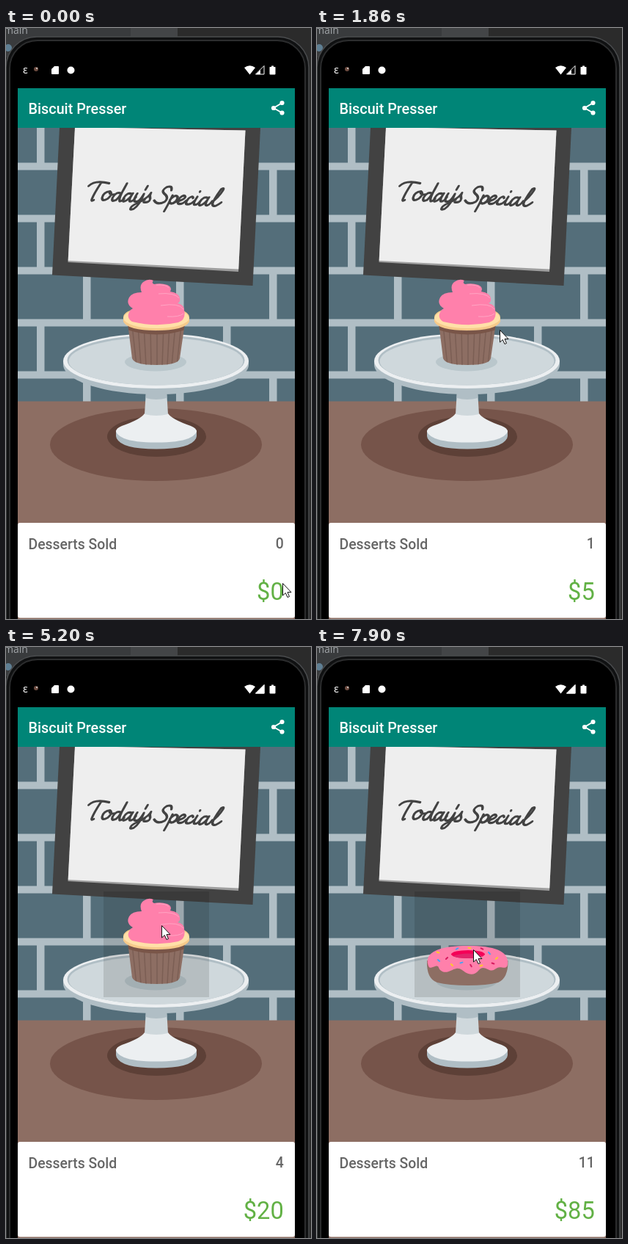
An HTML page without scripts that plays this animation: 416x805 px, repeating every 8000 ms.

```html
<!DOCTYPE html>
<html lang="en">
<head>
<meta charset="utf-8">
<title>Biscuit Presser</title>
<style>
html, body { margin: 0; width: 100%; height: 100%; overflow: hidden; background: #2b2b2b; }
.stage { position: relative; width: 416px; height: 805px; overflow: hidden; font-family: Roboto, sans-serif; }
svg { position: absolute; left: 0; top: 0; display: block; }

/* Every part switches hard on one shared clock. */
.pointer, .ripple, .cupcake, .donut, .reel, .full-signal {
  animation: 8s step-end -4ms infinite;
}
.pointer { animation-name: point; }
.ripple { animation-name: ripple; }
.cupcake { animation-name: leave; }
.donut { animation-name: arrive; }
.full-signal { animation-name: signal; }
.reel { animation-name: reel; white-space: pre; line-height: 40px; text-align: right; }

.window { position: absolute; right: 37.3px; width: 120px; height: 40px; overflow: hidden; }
.sold { top: 683px; font-size: 19.4px; font-weight: 500; color: #666; }
.money { top: 748px; font-size: 32.6px; color: #62b145; }

@keyframes point {
  0% { transform: translate(377px, 756px); }
  3.375% { transform: translate(331px, 560px); }
  4.875% { transform: translate(294px, 431px); }
  6.75% { transform: translate(270px, 421px); }
  8.25% { transform: translate(249px, 411px); }
  34.875% { transform: translate(242px, 491px); }
  45% { transform: translate(223px, 391px); }
  46.875% { transform: translate(212px, 379px); }
  77.75% { transform: translate(245px, 411px); }
  79.625%, 100% { transform: translate(213px, 412px); }
}
@keyframes reel {
  0% { transform: translateY(0); }
  13.25% { transform: translateY(-40px); }
  51.875% { transform: translateY(-80px); }
  57.125% { transform: translateY(-120px); }
  61.625% { transform: translateY(-160px); }
  66.5% { transform: translateY(-200px); }
  71.75% { transform: translateY(-240px); }
  79.625% { transform: translateY(-280px); }
  85.25% { transform: translateY(-320px); }
  89.75% { transform: translateY(-360px); }
  93.125% { transform: translateY(-400px); }
  96.875%, 100% { transform: translateY(-440px); }
}
@keyframes ripple {
  0%, 23.25% { opacity: 0; }
  13.25%, 51.875% { opacity: .6; }
  14.75%, 53.75%, 57.125%, 61.625% { opacity: 1; }
  55.625%, 60.125% { opacity: .5; }
  66.5%, 71.75% { opacity: .85; }
  69.875%, 83.375% { opacity: .7; }
  74.75%, 85.25%, 100% { opacity: 1; }
}
@keyframes leave { 0% { opacity: 1; } 66.5%, 100% { opacity: 0; } }
@keyframes arrive { 0% { opacity: 0; } 66.5%, 100% { opacity: 1; } }
@keyframes signal { 0% { opacity: 0; } 55.625%, 100% { opacity: 1; } }
</style>
</head>
<body>
<div class="stage">
<svg width="416" height="805" viewBox="0 0 416 805">
  <defs>
    <pattern id="bricks" patternUnits="userSpaceOnUse" x="0" y="183.5" width="127" height="142">
      <rect width="127" height="142" fill="#546e7a"/>
      <path d="M0 0h127v10H0zM0 71h127v10H0zM105 0h10.500v72h-10.500zM42 71h10.500v71H42z" fill="#b0bec5"/>
    </pattern>
    <clipPath id="wrapper"><path d="M166 402H244L237 450Q235 459 205 459Q175 459 172 450Z"/></clipPath>
    <rect id="sprinkle" x="-2.500" y="-1" width="5" height="2" rx="1"/>
  </defs>

  <!-- desktop and phone body -->
  <rect width="416" height="805" fill="#2b2b2b"/>
  <rect width="170" height="40" fill="#393b3d"/>
  <rect x="170" width="64" height="40" fill="#434547"/>
  <text x="-3" y="8" font-family="Open Sans, sans-serif" font-size="14" fill="#a0a4a8">main</text>
  <circle cx="3" cy="27" r="5" fill="#5f7f94"/>
  <rect x="0" y="12" width="413" height="840" rx="42" fill="#101112" stroke="#4a4c4e" stroke-width="1.500"/>
  <rect x="5" y="17" width="403" height="840" rx="38" stroke="#2c2d2e" stroke-width="2"/>
  <rect x="11" y="24" width="390" height="840" rx="32"/>

  <!-- status bar -->
  <text x="23" y="62" font-family="Noto Sans, sans-serif" font-size="14" fill="#fff">ε</text>
  <circle cx="41" cy="56" r="3" fill="#6d4c41"/>
  <circle cx="42" cy="55" r="1" fill="#ddd"/>
  <g fill="#fff">
    <path d="M66 52h5q1 0 1 1v9q0 1-1 1h-8q-1 0-1-1v-6z"/>
    <circle cx="88.500" cy="57.500" r="5"/>
    <path d="M325 54Q332.500 48.500 340 54L332.500 63.500Z"/>
    <path d="M352 51.500V63H340.500Z" fill="none" stroke="#fff"/>
    <path d="M347 57V63H341Z"/>
    <path class="full-signal" d="M352.500 51V63.500H340Z"/>
    <path d="M362 51.500h3v1.500h2q.5 0 .5.5v9q0 1-1 1h-6q-1 0-1-1v-9q0-.5.5-.5h2z"/>
  </g>

  <!-- app bar -->
  <rect x="16" y="82" width="378" height="54" fill="#008577"/>
  <text x="30.500" y="116.500" font-size="19.800" font-weight="500" fill="#fff">Biscuit Presser</text>
  <g fill="#fff">
    <path d="M376.500 102L365 109L376.500 115.500" fill="none" stroke="#fff" stroke-width="2"/>
    <circle cx="376.500" cy="102" r="3.100"/><circle cx="365" cy="109" r="3.100"/><circle cx="376.500" cy="115.500" r="3.100"/>
  </g>

  <!-- wall and table -->
  <rect x="16" y="136" width="378" height="373" fill="url(#bricks)"/>
  <rect x="16" y="508.500" width="378" height="297" fill="#8d6e63"/>
  <ellipse cx="204.500" cy="567.500" rx="144.500" ry="49.500" fill="#76544a"/>
  <ellipse cx="205.500" cy="556.500" rx="67.500" ry="27.500" fill="#5d4037"/>

  <!-- sign -->
  <path d="M73 136H347L336.500 351L63 336.500Z" fill="#424242"/>
  <path d="M94 136H150L326.500 139.500L317 332L84.500 319Z" fill="#9e9e9e"/>
  <path d="M94 136H150L326.500 139.500L317.200 328.500L84.700 317Z" fill="#eee"/>
  <g transform="translate(110 233) rotate(3) skewX(-18)" fill="none" stroke="#424242" stroke-width="3.200" stroke-linecap="round" stroke-linejoin="round">
    <path d="M-4-18Q1-27 22-23M11-23Q7-8 7 0Q7 3 10 1"/>
    <path d="M27-12Q19-11 20-3Q22 3 28-2Q33-9 27-12Q28-7 34-8"/>
    <path d="M43-10Q36-13 34-4Q34 3 40-1Q44-6 46-24Q42-4 45 0Q47 2 50-3"/>
    <path id="a" d="M58-10Q51-13 49-4Q49 3 54-1Q58-5 59-11Q56 0 60 0Q63 0 65-6"/>
    <path d="M65-11Q62 0 67 0Q72 0 74-11Q74 4 68 10Q62 13 64 7Q68 2 78-3M75-22L74-17"/>
    <path d="M76-3Q82-8 83-13Q82-9 85-5Q86 1 78 0"/>
    <path d="M109-18Q108-25 101-22Q95-17 101-13Q110-8 106-2Q98 4 91-3"/>
    <path d="M113-11Q112 2 110 11M112-5Q117-14 121-9Q122-1 116 0Q113 0 112-3"/>
    <path d="M119-2Q132-6 131-10Q128-14 124-8Q122 0 127 0Q131 0 134-5"/>
    <path d="M142-9Q140-13 136-8Q133 0 138 0Q142 0 145-5"/>
    <path d="M147-11Q144 0 148 0Q151 0 153-5M148-18v-.5"/>
    <use href="#a" x="104"/>
    <path d="M169-4Q176-12 178-21Q179-26 175-23Q170-8 171-2Q174 4 182-5"/>
  </g>

  <!-- cake stand -->
  <path d="M150 548V556Q153 573.500 205 573.500Q257 573.500 260 556V548Z" fill="#b0bec5"/>
  <path d="M189 525Q184 533 158 542Q150 545 150 550Q156 564.500 205 564.500Q254 564.500 260 550Q260 545 252 542Q226 533 221 525Z" fill="#eceff1"/>
  <path d="M191 494H219L221 526Q205 530 189 526Z" fill="#cfd8dc"/>
  <path d="M191 494H219L219.500 504Q205 508 190.500 504Z" fill="#b0bec5"/>
  <path d="M78 453V459C79 481 136 499 204.500 499S330 481 331 459V453Z" fill="#b0bec5"/>
  <ellipse cx="204.500" cy="453.500" rx="126.500" ry="37.500" fill="#eceff1"/>
  <ellipse cx="204.500" cy="452.500" rx="121" ry="34" fill="#b0bec5"/>
  <ellipse cx="204.500" cy="454" rx="119" ry="32.500" fill="#cfd8dc"/>
  <ellipse cx="204" cy="455" rx="42" ry="12.500" fill="#bac7cc"/>

  <rect class="ripple" x="133" y="333" width="144" height="144" fill="#000" fill-opacity=".12"/>

  <g class="cupcake">
    <g clip-path="url(#wrapper)">
      <rect x="160" y="400" width="90" height="62" fill="#8d6e63"/>
      <path d="M172 405L178 460M180 405L184 460M188 405L191 460M197 405L198 460M206 405V460M215 405L213 460M223 405L220 460M231 405L226 460M239 405L233 460" stroke="#7b5e54" stroke-width="1.500"/>
      <path d="M165 405Q205 420 245 405V411Q205 424 165 411Z" fill="#795548"/>
    </g>
    <path d="M160 394Q160 381 205 381T250 394V400Q244 412 205 412T160 400Z" fill="#f6ca8b"/>
    <ellipse cx="205" cy="395" rx="45" ry="14" fill="#ffe0a8"/>
    <path d="M172 400Q164 395 168 387Q170 383 173 382Q163 376 168 367Q172 360 185 360Q181 350 188 345.500Q194 341 201 344Q198 347 202 349Q211 347 220 350Q227 353 224 359Q236 361 237 368Q238 373 234 375Q243 377 243 384Q246 397 235 401Q205 408 172 400Z" fill="#ff80ab"/>
    <path d="M205 350Q219 349 222 354M208 362Q230 360 236 368M211 378Q236 374 242 383M220 393Q236 394 242 389" fill="none" stroke="#ffa6c4"/>
  </g>

  <g class="donut">
    <path d="M150 427Q149 452 164 457Q180 461 206 461T247 457Q261 451 260.500 427Z" fill="#8d6e63"/>
    <path d="M151 431C148 415 168 407 206 407S262 415 260 432C259 441 251 434 246 437S239 442 233 439S224 436 220 441S210 447 204 444S196 437 190 438S178 445 171 442S168 433 161 435S153 439 151 431Z" fill="#ff80ab"/>
    <ellipse cx="206" cy="418.500" rx="23" ry="5.500" fill="#f50057"/>
    <path d="M185 421Q205 414 227 421Q221 424 206 424T185 421Z" fill="#e2246b"/>
    <g fill="#ffca28">
      <use href="#sprinkle" transform="translate(165 416) rotate(20)"/>
      <use href="#sprinkle" transform="translate(208 410) rotate(10)"/>
      <use href="#sprinkle" transform="translate(245 424) rotate(-40)"/>
      <use href="#sprinkle" transform="translate(184 433) rotate(45)"/>
      <use href="#sprinkle" transform="translate(224 434) rotate(-20)"/>
    </g>
    <g fill="#42a5f5">
      <use href="#sprinkle" transform="translate(166 427) rotate(40)"/>
      <use href="#sprinkle" transform="translate(191 411) rotate(-30)"/>
      <use href="#sprinkle" transform="translate(235 417) rotate(50)"/>
      <use href="#sprinkle" transform="translate(197 430) rotate(-15)"/>
    </g>
    <g fill="#d81b60">
      <use href="#sprinkle" transform="translate(177 424) rotate(-45)"/>
      <use href="#sprinkle" transform="translate(225 411) rotate(25)"/>
      <use href="#sprinkle" transform="translate(210 434) rotate(60)"/>
      <use href="#sprinkle" transform="translate(240 431) rotate(20)"/>
    </g>
  </g>

  <!-- score card -->
  <rect x="16" y="674" width="378" height="129.500" rx="3" fill="#fff"/>
  <text x="30.500" y="709.500" font-size="19.400" font-weight="500" fill="#666">Desserts Sold</text>
</svg>

<div class="window sold"><div class="reel">0
1
2
3
4
5
6
7
8
9
10
11</div></div>
<div class="window money"><div class="reel">$0
$5
$10
$15
$20
$25
$35
$45
$55
$65
$75
$85</div></div>

<svg width="416" height="805" viewBox="0 0 416 805">
  <path class="pointer" d="M.5.5V17L4.300 13.500L7 19.500L9.500 18.400L7 12.600H12Z" fill="#fff" stroke="#111" stroke-linejoin="round"/>
</svg>
</div>
</body>
</html>
```
